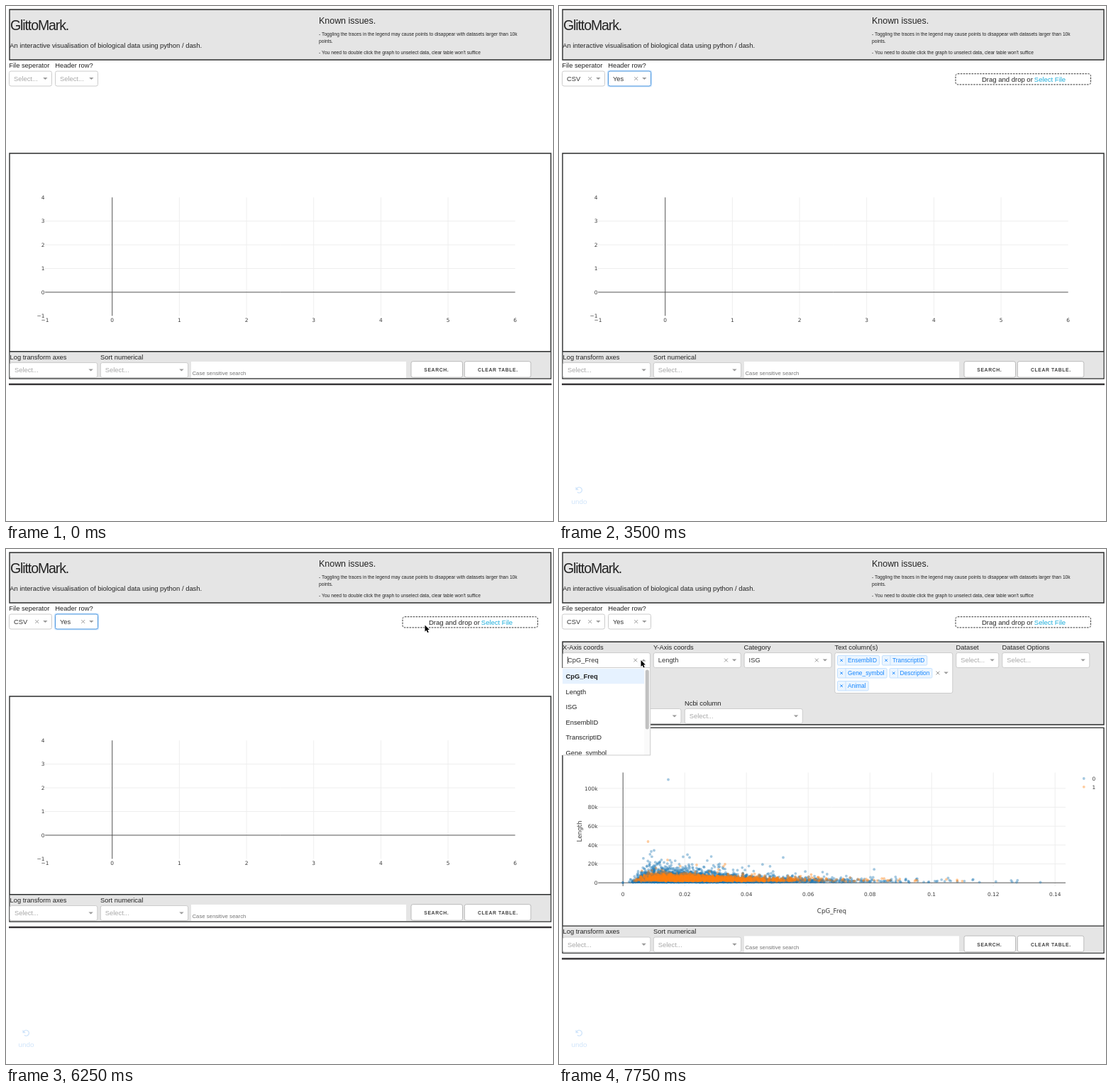
These frames come from a looping animation (771x727 px, 8 s). An HTML page with a canvas:

```html
<!DOCTYPE html>
<html lang="en">
<head>
<meta charset="utf-8">
<title>Scatter dashboard</title>
<style>
html, body { margin: 0; width: 100%; height: 100%; overflow: hidden; background: #fff; }
canvas { display: block; width: 771px; height: 727px; }
</style>
</head>
<body>
<canvas id="stage"></canvas>
<script>
const W = 771, H = 727, LOOP = 8000, STEP = 250;
const SANS = '"Liberation Sans", Arial, sans-serif';
const PLOT = '"DejaVu Sans", Verdana, sans-serif';
const INK = '#2b2d2d', GREY = '#e5e5e5', BLUE = '#1f77b4', ORANGE = '#ff7f0e';
const dpr = window.devicePixelRatio || 1;

function fit(canvas) {
  canvas.width = W * dpr;
  canvas.height = H * dpr;
  const c = canvas.getContext('2d');
  c.scale(dpr, dpr);
  return c;
}
const ctx = fit(document.getElementById('stage'));

// ---- drawing helpers ----
function text(str, x, y, o = {}) {
  ctx.font = `${o.bold ? 'bold ' : ''}${o.size || 9.35}px ${o.font || SANS}`;
  ctx.letterSpacing = (o.gap || 0) + 'px';
  ctx.textAlign = o.align || 'left';
  ctx.fillStyle = o.color || '#222';
  ctx.fillText(str, x, y);
  return ctx.measureText(str).width;
}

function rect(x, y, w, h, color) {
  ctx.fillStyle = color;
  ctx.fillRect(x, y, w, h);
}

function line(x1, y1, x2, y2, color, width = 1) {
  ctx.strokeStyle = color;
  ctx.lineWidth = width;
  ctx.beginPath();
  ctx.moveTo(x1, y1);
  ctx.lineTo(x2, y2);
  ctx.stroke();
}

function box(x, y, w, h, r, fill, stroke, width = 1) {
  ctx.beginPath();
  ctx.roundRect(x, y, w, h, r);
  if (fill) { ctx.fillStyle = fill; ctx.fill(); }
  if (stroke) { ctx.strokeStyle = stroke; ctx.lineWidth = width; ctx.stroke(); }
}

function poly(points, fill) {
  ctx.beginPath();
  points.forEach(([x, y]) => ctx.lineTo(x, y));
  ctx.closePath();
  ctx.fillStyle = fill;
  ctx.fill();
}

function dot(c, x, y, color) {
  c.fillStyle = color;
  c.beginPath();
  c.arc(x, y, 1.9, 0, 7);
  c.fill();
}

function panel(y, h, fill) {
  box(5, y, 763, h, 0, fill, INK, 1.4);
}

function cross(x, y, r, color) {
  line(x - r, y - r, x + r, y + r, color);
  line(x - r, y + r, x + r, y - r, color);
}

function arrow(x, y, up) {
  const d = up ? -1.6 : 1.6;
  poly([[x - 3.2, y - d], [x + 3.2, y - d], [x, y + d]], '#999');
}

// ---- widgets ----
function select(x, y, w, o = {}) {
  const h = o.h || 22, cy = y + (o.h ? h / 2 : 11);
  if (o.focus) box(x - 1, y - 1, w + 2, h + 2, 3, 'rgba(0,126,255,.2)');
  box(x + .5, y + .5, w - 1, h - 1, o.open ? [2.5, 2.5, 0, 0] : 2.5, '#fff', o.focus ? '#4f97dc' : '#ccc');
  if (!o.h) text(o.value || 'Select...', x + 7, y + 14.4, { color: o.value ? '#333' : '#a8a8a8' });
  if (o.clear) cross(x + w - 21.3, cy, 2.4, '#999');
  arrow(x + w - 9.7, cy, o.open);
}

function menu(x, y, w, options, hover) {
  const row = 21.6;
  box(x + .5, y, w - 1, row * options.length, [0, 0, 2.5, 2.5], '#fff', '#ccc');
  options.forEach((name, i) => {
    if (i === hover) rect(x + 1, y + row * i, w - 2, row - .5, '#e6f2ff');
    text(name, x + 4, y + row * i + 14.2);
  });
}

function tag(name, x, y) {
  const blue = '#1686ff';
  ctx.font = `8.4px ${SANS}`;
  ctx.letterSpacing = '0px';
  const w = ctx.measureText(name).width + 19;
  box(x + .5, y - 6.5, w - 1, 13.5, 1.5, '#ebf5ff', '#c2e0ff');
  line(x + 12, y - 6.5, x + 12, y + 7, '#c2e0ff');
  cross(x + 6.2, y + .2, 1.7, blue);
  text(name, x + 15, y + 3.2, { size: 8.4, color: blue });
}

function button(label, x, y, w, tx) {
  box(x + .5, y, w - 1, 22.5, 2.5, '#fff', '#bbb');
  text(label, tx, y + 14.6, { size: 6.8, bold: true, gap: .62, color: '#444' });
}

function header() {
  panel(5, 71, GREY);
  text('GlittoMark.', 6, 34.3, { size: 19.5, gap: -1.1 });
  text('An interactive visualisation of biological data using python / dash.', 5.3, 59, { size: 9.42 });
  text('Known issues.', 441, 25, { size: 12.45 });
  const small = { size: 6.68 };
  text('- Toggling the traces in the legend may cause points to disappear with datasets larger than 10k', 441, 42, small);
  text('points.', 441, 52.4, small);
  text("- You need to double click the graph to unselect data, clear table won't suffice", 441, 68, small);
}

function upload(active) {
  ctx.setLineDash(active ? [] : [2.5, 1.4]);
  box(559, 95.7, 190.5, 15.2, 3, active ? '#eee' : '#fff', active ? '#6c6' : '#333');
  ctx.setLineDash([]);
  text('Drag and drop or', 596, 106.6, { size: 9.5 });
  text('Select File', 669.8, 106.6, { size: 9.5, color: '#1eaedb' });
}

function undo() {
  const c = '#cfe4fa';
  ctx.strokeStyle = c;
  ctx.lineWidth = 1.3;
  ctx.beginPath();
  ctx.arc(28.5, 683.3, 3.9, -2.5, 2.3);
  ctx.stroke();
  poly([[23.5, 678.8], [23.5, 683.2], [27.9, 683.2]], c);
  text('undo', 28.5, 703.2, { size: 9.8, color: c, align: 'center' });
}

function columns(expanded) {
  panel(131, expanded ? 117 : 111, GREY);
  const labels = [['X-Axis coords', 5], ['Y-Axis coords', 133], ['Category', 260.5],
    ['Text column(s)', 388.5], ['Dataset', 559.5], ['Dataset Options', 624.5]];
  labels.forEach(([name, x]) => text(name, x, 142));
  ['CpG_Freq', 'Length', 'ISG'].forEach((value, i) =>
    select(5 + 127.8 * i, 146, 124, { value, clear: expanded, open: step === 31 && !i }));
  select(388.3, 146, 167, { h: 58, clear: expanded });
  select(559.3, 146, 61);
  select(624.3, 146, 124);
  tag('EnsemblID', 392, 157);
  tag('TranscriptID', 455, 157);
  tag('Gene_symbol', 392, 175);
  tag('Description', 465.5, 175);
  tag('Animal', 392, 193);
  if (expanded) {
    text('Gene column', 5, 221);
    text('Ncbi column', 177, 221);
    select(5, 225, 167.5);
    select(176.8, 225, 167);
  }
}

function columnMenu() {
  const names = ['CpG_Freq', 'Length', 'ISG', 'EnsemblID', 'TranscriptID', 'Gene_symbol'];
  ctx.save();
  ctx.beginPath();
  ctx.rect(4, 168, 125.5, 123.5);
  ctx.clip();
  rect(4, 168, 125, 123, '#fff');
  rect(5, 169, 115, 21.3, '#e6f2ff');
  names.forEach((name, i) => text(name, 9.5, 183.4 + 21.5 * i, { bold: !i }));
  rect(120, 169, 8.5, 122, '#fafafa');
  box(121.8, 170.5, 5, 84, 2.5, '#c1c1c1');
  ctx.restore();
  line(128.7, 168, 128.7, 291, '#ccc');
  line(5, 291, 129, 291, '#ccc');
  line(12.3, 152, 12.3, 162, '#222', .8);
}

// ---- plots ----
const tick = (s, x, y, align) => text(s, x, y, { size: 7.4, font: PLOT, align, color: '#3a3a3a' });

function emptyPlot(dy) {
  const gx = n => 149.7 + 94.67 * n, gy = n => 404 - 33.45 * n + dy;
  const name = n => String(n).replace('-', '\u2212');
  for (let n = 1; n < 6; n++) line(gx(n), gy(4), gx(n), gy(-1), '#eee');
  for (let n = 1; n < 4; n++) line(55, gy(n), 717.7, gy(n), '#eee');
  line(gx(0), gy(4), gx(0), gy(-1), '#555');
  line(55, gy(0), 717.7, gy(0), '#555');
  for (let n = -1; n < 7; n++) tick(name(n), gx(n), 445.5 + dy, 'center');
  for (let n = -1; n < 5; n++) tick(name(n), 54.5, gy(n) + 2.7, 'right');
}

function random(seed) {
  return () => {
    seed = seed + 0x6D2B79F5 | 0;
    let t = Math.imul(seed ^ seed >>> 15, 1 | seed);
    t = t + Math.imul(t ^ t >>> 7, 61 | t) ^ t;
    return ((t ^ t >>> 14) >>> 0) / 4294967296;
  };
}

// Log-normal cloud that flattens towards the right
function cloud(c, count, seed, color, mx, sx, my, sy) {
  const rnd = random(seed);
  const normal = () => Math.sqrt(-2 * Math.log(1 - rnd())) * Math.cos(2 * Math.PI * rnd());
  for (let i = 0; i < count; i++) {
    const x = mx * Math.exp(sx * normal());
    const h = my * Math.exp(sy * normal()) * Math.min(1, x / 35) / (1 + x / 330);
    if (x < 560 && h < 42) dot(c, 90 + x, 471 - h, color);
  }
}

const points = document.createElement('canvas');
{
  const c = fit(points);
  c.globalAlpha = .4;
  cloud(c, 7000, 11, BLUE, 85, .6, 4.6, .75);
  [[154, 325.5], [130, 427], [134, 425.5], [316, 435.5], [175, 434.5], [678.5, 470.5], [645, 470.5], [90, 471], [90, 471]]
    .forEach(([x, y]) => dot(c, x, y, BLUE));
  cloud(c, 2200, 5, ORANGE, 97, .53, 7, .4);
  [[125.5, 413], [234, 445], [153, 439], [194, 446]].forEach(([x, y]) => dot(c, x, y, ORANGE));
}

function scatterPlot() {
  const gx = n => 90.2 + 87 * n, gy = n => 471.2 - 26.65 * n;
  for (let n = 1; n < 8; n++) line(gx(n), 315.5, gx(n), 476, '#eee');
  for (let n = 1; n < 6; n++) line(55, gy(n), 714, gy(n), '#eee');
  line(gx(0), 315.5, gx(0), 476, '#555');
  line(55, gy(0), 714, gy(0), '#555');
  for (let n = 0; n < 8; n++) tick(String(+(n * .02).toFixed(2)), gx(n), 490, 'center');
  for (let n = 0; n < 6; n++) tick(n ? n * 20 + 'k' : '0', 54.5, gy(n) + 2.7, 'right');
  ctx.drawImage(points, 0, 0, W, H);
  const title = { size: 8.7, font: PLOT, align: 'center', color: '#3a3a3a' };
  text('CpG_Freq', 384.5, 514, title);
  ctx.save();
  ctx.translate(32, 398.5);
  ctx.rotate(-Math.PI / 2);
  text('Length', 0, 0, title);
  ctx.restore();
  [BLUE, ORANGE].forEach((color, i) => {
    ctx.globalAlpha = .4;
    dot(ctx, 739.8, 324 + 11.8 * i, color);
    ctx.globalAlpha = 1;
    tick(String(i), 751.5, 326.8 + 11.8 * i);
  });
}

function graph(dy, plotted) {
  panel(208 + dy, 318, '#fff');
  rect(5.7, 488 + dy, 761.6, 37.3, GREY);
  line(5, 487.7 + dy, 768, 487.7 + dy, INK, 1.4);
  if (plotted) scatterPlot(); else emptyPlot(dy);
  text('Log transform axes', 5.5, 498.7 + dy);
  text('Sort numerical', 133, 498.7 + dy);
  select(5, 503 + dy, 124.3);
  select(132.8, 503 + dy, 124.3);
  rect(261, 502 + dy, 303, 23, '#fff');
  text('Case sensitive search', 262.5, 521 + dy, { size: 7.75, color: '#757575' });
  button('SEARCH.', 570.5, 501.7 + dy, 73.5, 589.3);
  button('CLEAR TABLE.', 645.8, 501.7 + dy, 94.5, 665);
  rect(4, 532.8 + dy, 765, 2.4, '#333133');
}

// ---- pointer ----
function pointer(x, y) {
  ctx.save();
  ctx.translate(x, y);
  const shape = [[0, 0], [0, 9], [2.1, 7.2], [3.6, 10.6], [5.2, 9.9], [3.7, 6.6], [6.4, 6.4]];
  ctx.strokeStyle = '#fff';
  ctx.lineWidth = 1.4;
  ctx.lineJoin = 'round';
  poly(shape, '#000');
  ctx.stroke();
  poly(shape, '#000');
  ctx.restore();
}

function file(x, y) {
  const l = x - 15.5, t = y - 20;
  ctx.globalAlpha = .75;
  ctx.beginPath();
  ctx.moveTo(l, t);
  ctx.lineTo(l + 19, t);
  ctx.quadraticCurveTo(l + 28, t + 2, l + 29, t + 12);
  ctx.lineTo(l + 29, t + 32);
  ctx.lineTo(l, t + 32);
  ctx.closePath();
  ctx.fillStyle = '#f1f1f1';
  ctx.fill();
  ctx.strokeStyle = '#d2d2d2';
  ctx.lineWidth = .8;
  ctx.stroke();
  rect(l + 2, t + 2, 8, 28, '#e2e2e2');
  rect(l + 12, t + 2, 5, 28, '#e8e8e8');
  poly([[l + 18, t + 1], [l + 28.5, t + 11], [l + 20, t + 8]], '#dcdcdc');
  ctx.globalAlpha = 1;
  box(x - 31.5, y + 16.5, 60.5, 10.6, 1.8, '#2478dc');
  text('10k_points.csv', x - 1.2, y + 24.6, { size: 7.9, bold: true, color: '#fff', align: 'center' });
}

const runs = {
  1: [[724, 519], [560, 400], [300, 230], [110, 130], [50, 103], [40, 124], [36.5, 146], [36.5, 146],
    [95, 106], [110, 103], [95, 125], [95, 125], [756, 689]],
  17: [[640, 650], [626, 520], [614.5, 385], [605, 220], [594, 110], [593, 107], [592, 107], [591, 108],
    [590.5, 107.5], [350, 155.5], [310, 157], [245, 159], [175, 158], [122, 157], [115.5, 157]]
};

function pointerAt(s) {
  return (runs[1][s - 1]) || runs[17][s - 17];
}

// ---- timeline ----
let step = -1;

function draw() {
  rect(0, 0, W, H, '#fff');
  header();
  const csv = step >= 8, yes = step >= 12, loaded = step >= 26, expanded = step >= 27;
  graph(expanded ? 44.4 : loaded ? 38.4 : 0, step >= 28);
  if (loaded) columns(expanded);

  text('File seperator', 4.3, 87.3);
  text('Header row?', 69.2, 87.3);
  const fileOpen = step >= 5 && step < 8, rowOpen = step === 10 || step === 11;
  select(4, 91.5, 61, { value: csv && 'CSV', clear: csv, open: fileOpen, focus: csv && step < 10 });
  select(69, 91.5, 61, { value: yes && 'Yes', clear: yes, open: rowOpen, focus: yes && step < 31 });
  if (fileOpen) menu(4, 114, 62, ['TSV', 'CSV'], step === 7 ? 1 : 0);
  if (rowOpen) menu(69, 114, 62, ['Yes', 'No'], 0);
  if (csv) undo();
  if (yes) upload(step === 21);
  if (step === 31) columnMenu();

  const p = pointerAt(step);
  if (p) {
    if (step >= 17 && step <= 21) file(...p);
    pointer(...p);
  }
}

function tickFrame(now) {
  const next = Math.floor(now % LOOP / STEP);
  if (next !== step) {
    step = next;
    draw();
  }
  requestAnimationFrame(tickFrame);
}
tickFrame(performance.now());
</script>
</body>
</html>
```
